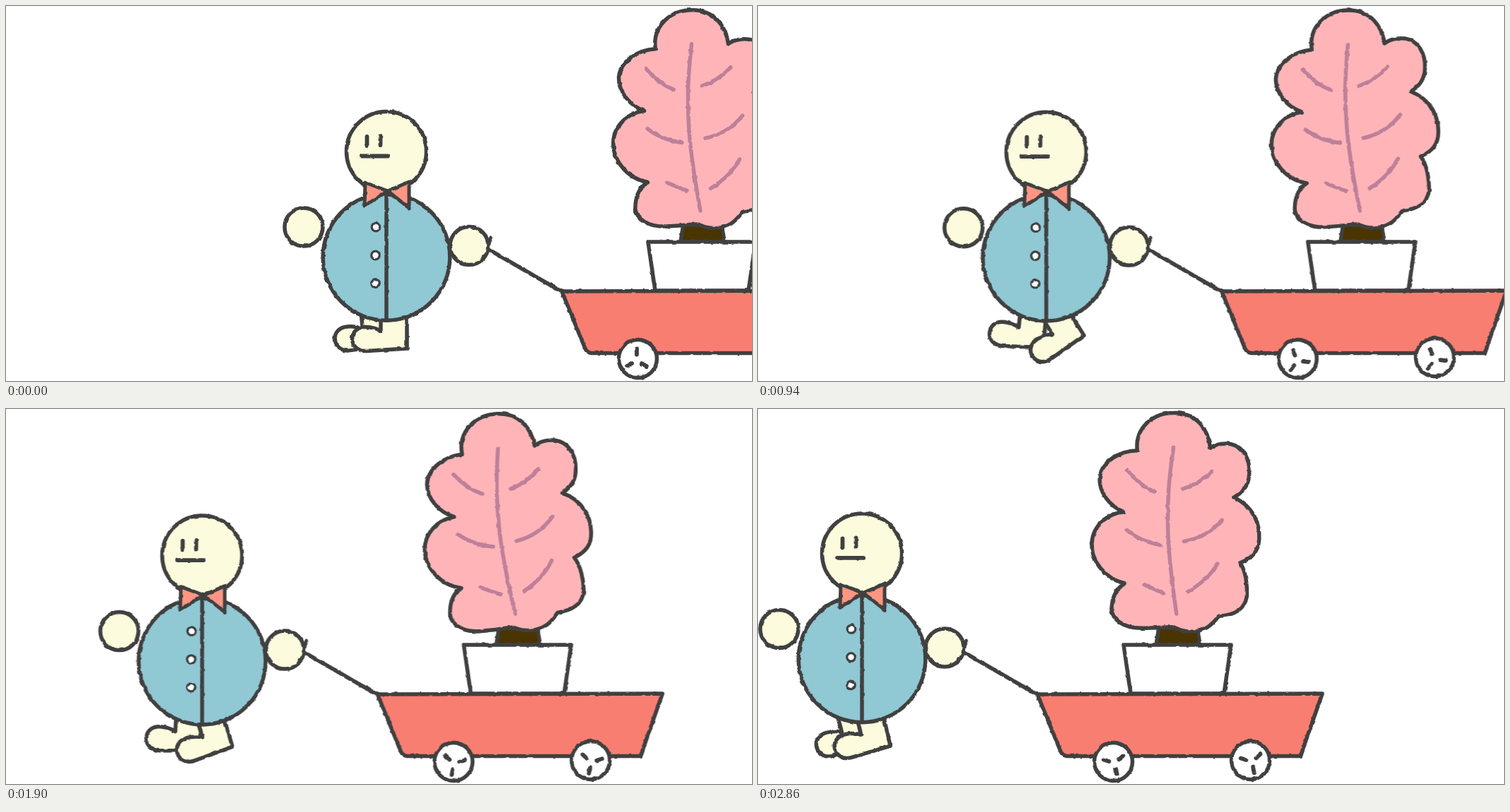
An HTML page for the animation above (2.98 s loop, 1055 by 531 pixels).

```html
<!DOCTYPE html>
<html lang="en">
<head>
<meta charset="utf-8">
<title>Walk with a potted tree</title>
<style>
  html, body { margin: 0; width: 100%; height: 100%; overflow: hidden; background: #fff; }
  svg { display: block; width: 100%; height: 100%; }
  .ink { stroke: #404040; stroke-width: 5.5; stroke-linecap: round; stroke-linejoin: round; fill: none; }
  .skin { fill: #fcfbdd; }
  .bow { fill: #ff9683; stroke-width: 5; }
  .white { fill: #fff; }
  .veins { stroke: #be8099; }
  .buttons { fill: #fff; stroke-width: 3.2; }
  .face, .spokes { stroke-width: 5.8; }
</style>
</head>
<body>
<svg viewBox="0 0 1055 531">
  <defs>
    <filter id="rough" filterUnits="userSpaceOnUse" x="350" y="-10" width="860" height="560" color-interpolation-filters="sRGB">
      <feTurbulence type="fractalNoise" baseFrequency="0.12" numOctaves="2" seed="4"/>
      <feDisplacementMap in="SourceGraphic" scale="3" xChannelSelector="R" yChannelSelector="G"/>
    </filter>
    <path id="leg" d="M567 430V485L510 488.5C484 490 482 454 509 454.5Q521 455 530 460V430"/>
    <g id="wheel">
      <circle r="27" class="white"/>
      <path class="spokes" d="M-1.5-6V-14M5.4 6.5L12.4 10.5M-8.4 6.5L-15.4 10.5"/>
    </g>
  </defs>
  <g id="scene"><g class="ink" filter="url(#rough)">
    <path d="M958 308H1012L1016 334H954Z" fill="#4a3500"/>
    <g id="tree">
      <path fill="#ffb5b8" d="M915 62C910 30 935 6 967 6C998 6 1014 28 1018 53C1026 46 1040 45 1047 46C1066 49 1076 68 1075 88C1075 103 1068 113 1055 121C1085 133 1094 158 1094 178C1094 196 1085 206 1069 213C1078 225 1081 245 1081 260C1079 280 1062 288 1043 290C1033 304 1024 313 1005 314S985 309 978 309S940 314 925 313C902 311 889 298 891 283C892 268 898 257 908 251C880 247 858 222 858 196C858 172 878 153 901 150C880 143 864 124 864 103C866 80 890 64 915 62Z"/>
      <path class="veins" d="M966 55C961 110 962 130 964 165S976 255 983 290M902 90Q920 111 942 119M1022 86Q1005 105 982 113M906 175Q925 190 955 194M1040 154Q1020 180 988 187M935 251L963 262M1037 216Q1025 240 997 258"/>
    </g>
    <path class="white" d="M908 334H1060L1050 403H918Z"/>
    <path d="M786 404L1189 403L1158 491.5H828Q822 491 819 485Z" fill="#f97e72"/>
    <use href="#wheel" x="893.5" y="499.5"/>
    <use href="#wheel" x="1087.5" y="497.5"/>
    <path d="M686 328L681 342M683 345L785 404"/>
    <g id="walker">
      <g transform="translate(-28.3 -4)"><use id="farLeg" href="#leg" class="skin"/></g>
      <use id="nearLeg" href="#leg" class="skin"/>
      <circle cx="538" cy="206" r="56.5" class="skin"/>
      <circle cx="538" cy="355.5" r="89.8" fill="#90c8d4"/>
      <path d="M538 264V444"/>
      <path class="face" d="M510.5 185V198M529.5 184V197M503 212.5H540"/>
      <path class="bow" d="M508 250L507 283L540 262ZM570 249V286L540 262Z"/>
      <g class="buttons">
        <circle cx="523" cy="313" r="5.8"/><circle cx="522.5" cy="353" r="5.8"/><circle cx="522.5" cy="392.5" r="5.8"/>
      </g>
      <circle cx="421" cy="313" r="27" class="skin"/>
      <circle cx="655" cy="339.5" r="27" class="skin"/>
    </g>
  </g></g>
</svg>
<script>
  const LOOP = 2980, FIRST = 100, STEP = 120, STRIDE = 16.29;
  // One walk cycle: bob, tree angle, near leg angle, far leg angle
  const cycle = [
    [-3.6, 6.8, 3.5, -45],
    [1.6, -1.8, -16.6, 3.5],
    [-4.6, 8, -33, 8],
    [0.7, 0, -32, 5.7],
    [-1.6, 3.1, -13, -16],
  ];
  const start = [0, 1.1, 0, -5.5];

  const byId = id => document.getElementById(id);
  const put = (el, value) => el.setAttribute('transform', value);
  const spokes = document.querySelector('.spokes');
  let shown = -1;

  function pose(step) {
    const [bob, sway, near, far] = step ? cycle[step % 5] : start;
    put(byId('scene'), `translate(${-STRIDE * step} 0)`);
    put(byId('walker'), `translate(0 ${bob})`);
    put(byId('tree'), `translate(-1.5 0) rotate(${sway} 984 314)`);
    put(byId('nearLeg'), `rotate(${near} 545.5 433)`);
    put(byId('farLeg'), `rotate(${far} 545.5 433)`);
    put(spokes, `rotate(${-48 * step})`);
  }

  function tick() {
    const t = performance.now() % LOOP;
    const step = t < FIRST ? 0 : 1 + Math.floor((t - FIRST) / STEP);
    if (step !== shown) pose(shown = step);
    requestAnimationFrame(tick);
  }
  tick();
</script>
</body>
</html>
```
